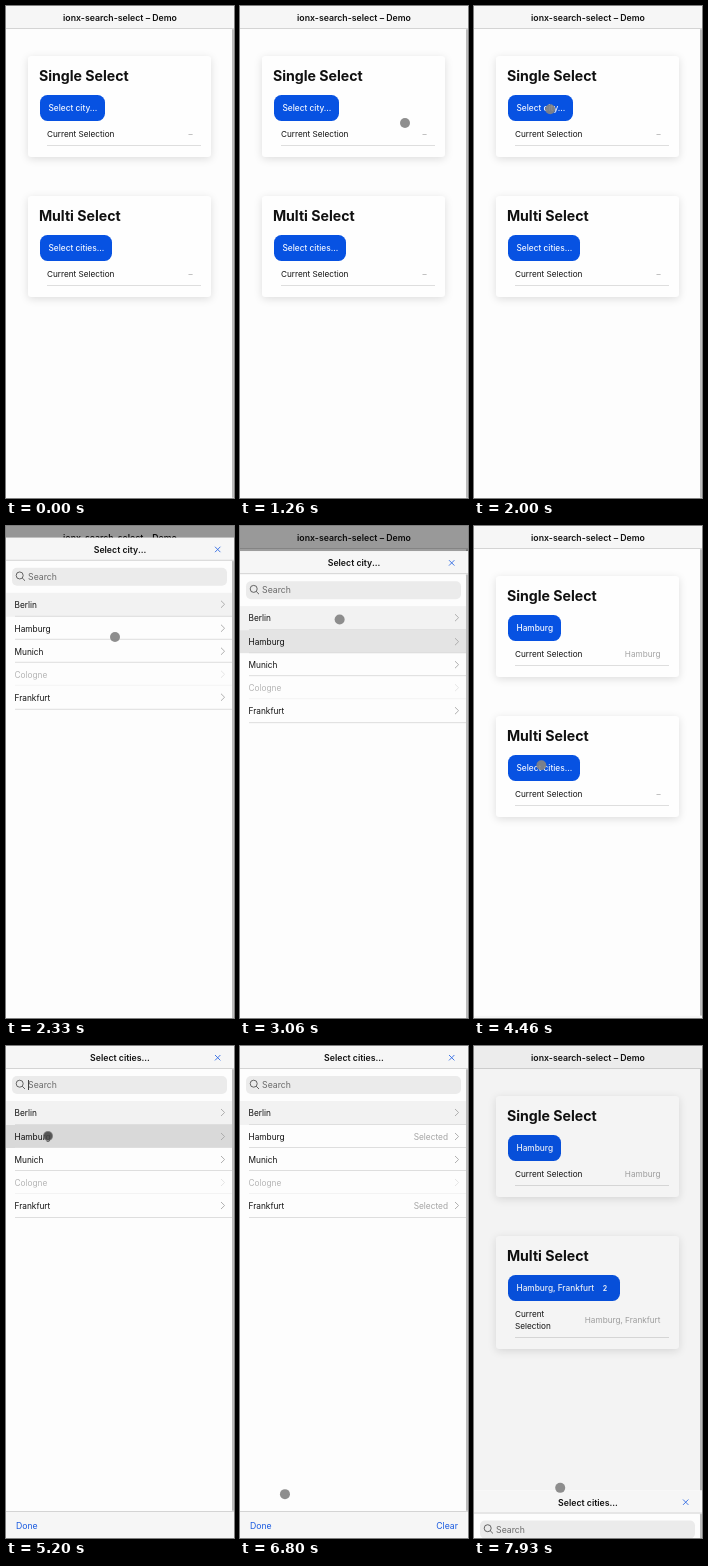
Write an HTML page that moves like this. It is 228 by 492 pixels and loops after 8 s.

```html
<!DOCTYPE html>
<html lang="en">
<meta charset="utf-8">
<title>ionx-search-select – Demo</title>
<style>
  * { box-sizing: border-box; }
  html, body { margin: 0; width: 100%; height: 100%; overflow: hidden; }
  body { position: relative; background: #fdfdfd; color: #111; font: 8.3px/12px Inter, sans-serif; }
  body > *, .page > *, .modal > *, .card > *, .bar > * { position: absolute; }
  .page, .modal, .shade { left: 0; top: 0; width: 228px; height: 492px; }
  .modal { background: #fdfdfd; }
  .shade { background: #000; }
  .bar { left: 0; width: 228px; height: 23.4px; background: #f6f6f6; border-bottom: 1px solid #d4d4d4;
    font-size: 8.75px; font-weight: 600; line-height: 24px; text-align: center; }
  .bar span { left: 0; width: 100%; }
  .scroll { right: 0; top: 23px; bottom: 0; width: 2.5px; background: #bcbcbc; border-radius: 1px; }
  .card { left: 22.3px; width: 183.2px; padding: 66.5px 10.5px 11px 18.7px; background: #fefefe;
    border-radius: 3px; box-shadow: 0 2px 8px rgba(0, 0, 0, .13); }
  h1 { margin: 0; left: 10.6px; top: 10.5px; font-size: 14.15px; line-height: 18px; font-weight: 700; white-space: nowrap; }
  .button { left: 11.7px; top: 39px; height: 26px; padding: 0 7.5px 0 8.5px; border-radius: 7.5px; background: #0752e2;
    color: #f4f7ff; font-size: 8.3px; font-weight: 500; line-height: 26px; white-space: nowrap; }
  .button.on { background: #0549ca; }
  .badge { display: inline-block; width: 15.5px; margin-left: 3px; font-size: 7px; font-weight: 700; text-align: center; }
  .card .current { position: static; display: flex; gap: 8.5px; align-items: center; padding: 5.5px 8.5px 4.5px 0;
    border-bottom: 1px solid #dedede; font-size: 8.2px; }
  .current span { flex: 1; }
  .current b, .state { font-weight: 400; color: #a3a3a3; white-space: nowrap; }
  .search { left: 6.2px; top: 29.7px; width: 215px; height: 18.6px; padding-left: 15.9px; border-radius: 5px;
    background: #ebebeb; color: #6a6a6a; font-size: 8.7px; line-height: 19px; }
  .caret { position: absolute; left: 15.8px; top: 4.3px; width: 1px; height: 10.5px; background: #444; }
  svg { position: absolute; fill: none; overflow: visible; }
  .list { top: 55.3px; width: 228px; }
  .item { position: relative; height: 23.25px; padding-left: 8.5px; line-height: 24px; }
  .item::after { content: ""; position: absolute; left: 8.5px; right: 0; bottom: 0; height: 1px; background: #dedede; }
  .item.first { background: #f2f2f2; }
  .item.off { opacity: .3; }
  .press { position: absolute; inset: 0; background: #000; }
  .state { position: absolute; right: 20px; }
  .foot { top: 465px; height: 27px; padding: 0 10px; background: #f6f6f6; border-top: 1px solid #d4d4d4; width: 228px;
    display: flex; justify-content: space-between; color: #1a5be0; font-size: 8.7px; line-height: 29px; }
  .cursor { left: -5.2px; top: -5.2px; width: 10.4px; height: 10.4px; border-radius: 50%; background: rgba(132, 132, 132, .92); }
  .cursor.on { background: rgba(70, 70, 70, .9); border: 1.6px solid rgba(130, 130, 130, .9); }
</style>
<body>
<script>
const LOOP = 8000, HEIGHT = 492;
const SLIDE = 500, FADE = 200;
const cities = ["Berlin", "Hamburg", "Munich", "Cologne", "Frankfurt"];

const icon = (x, y, color, d, width = 1) =>
  `<svg style="left:${x}px;top:${y}px" width="1" height="1" stroke="${color}" stroke-width="${width}"><path d="${d}"/></svg>`;

const card = (id, title, top) => `<div class="card" id="${id}" style="top:${top}px"><h1>${title}</h1>
  <div class="button"></div><div class="current"><span>Current Selection</span><b></b></div></div>`;

const item = (city, i) => `<div class="item ${i === 0 ? "first" : i === 3 ? "off" : ""}">${city}
  <i class="press"></i><span class="state"></span>${icon(215.3, 8.2, "#a8a8a8", "M0 0 3.6 3.5 0 7", .9)}</div>`;

document.body.innerHTML = `
  <div class="page"><div class="bar"><span>ionx-search-select – Demo</span></div>
    ${card("single", "Single Select", 50)}${card("multi", "Multi Select", 190)}<div class="scroll"></div></div>
  <div class="shade"></div>
  <div class="modal">
    <div class="bar"><span id="heading"></span>${icon(208.8, 9.2, "#2f6ae4", "M0 0 5.4 5.4M5.4 0 0 5.4", .9)}</div>
    <div class="search">Search<i class="caret"></i>
      ${icon(4, 4.7, "#555", "M7.2 3.7A3.5 3.5 0 1 1 .2 3.7A3.5 3.5 0 1 1 7.2 3.7M6.2 6.2 9 9", .9)}</div>
    <div class="list">${cities.map(item).join("")}</div>
    <div class="scroll"></div>
    <div class="foot"><span>Done</span><span id="clear">Clear</span></div>
  </div>
  <div class="cursor"></div>`;

const $ = selector => document.querySelector(selector);
const shade = $(".shade"), modal = $(".modal"), cursor = $(".cursor"), caret = $(".caret"), foot = $(".foot");
const rows = [...document.querySelectorAll(".item")];

// [time, x, y] stops of the pointer
const path = [
  [1260, 165, 117], [1760, 75, 103], [1960, 75, 103], [2330, 109, 111], [2650, 100, 93], [3030, 100, 93],
  [3530, 67, 169], [4000, 68, 243], [4400, 68, 243], [5060, 42, 90], [5330, 42, 90], [5660, 60, 164],
  [6440, 60, 164], [6800, 45, 448], [7300, 20, 484], [7690, 20, 484], [7930, 86, 442], [8000, 98, 434]
];
// Pointer down, pointer up, and what it hits: a button or a row index
const presses = [
  [1830, 1960, "single"], [2860, 3000, 1], [4260, 4400, "multi"],
  [5200, 5330, 1], [5800, 5930, 4], [7530, 7680, "done"]
];
const modals = [
  { open: 2030, close: 3050, title: "Select city..." },
  { open: 4460, close: 7745, title: "Select cities...", multi: true }
];

const clamp = v => Math.min(1, Math.max(0, v));

// cubic-bezier(.32, .72, 0, 1)
function ease(x) {
  let lo = 0, hi = 1;
  for (let i = 0; i < 24; i++) {
    const s = (lo + hi) / 2;
    if (.96 * (1 - s) ** 2 * s + s ** 3 < x) lo = s; else hi = s;
  }
  const s = lo;
  return 2.16 * (1 - s) ** 2 * s + 3 * (1 - s) * s * s + s ** 3;
}

// Monotone cubic through the stops: smooth in passing, at rest on holds and turns
function slope(i, axis) {
  const step = j => path[j] && path[j + 1] ? (path[j + 1][axis] - path[j][axis]) / (path[j + 1][0] - path[j][0]) : 0;
  const before = step(i - 1), after = step(i);
  return before * after > 0 ? 2 * before * after / (before + after) : 0;
}

function pointerAt(t, axis) {
  let i = 0;
  while (i < path.length - 2 && t >= path[i + 1][0]) i++;
  const a = path[i], b = path[i + 1], span = b[0] - a[0];
  const u = clamp((t - a[0]) / span), v = 1 - u;
  return a[axis] * v * v * (1 + 2 * u) + b[axis] * u * u * (1 + 2 * v)
    + span * u * v * (v * slope(i, axis) - u * slope(i + 1, axis));
}

function setHTML(el, html) {
  if (el.shown !== html) el.innerHTML = el.shown = html;
}

function showCard(id, label, value, pressed) {
  const button = $(`#${id} .button`);
  setHTML(button, label);
  button.classList.toggle("on", pressed === id);
  setHTML($(`#${id} b`), value);
}

function render(t) {
  const press = presses.find(p => t >= p[0] && t < p[1]);
  const lastPress = presses.filter(p => t >= p[0]).pop() || [];
  const target = press && press[2];
  const { open, close, title, multi } = modals[t < 4000 ? 0 : 1];
  const shown = ease(clamp((t - open) / SLIDE)) * (1 - ease(clamp((t - close) / SLIDE)));

  const both = "Hamburg, Frankfurt";
  const chosen = t >= modals[0].close, done = t >= modals[1].close;
  showCard("single", chosen ? "Hamburg" : "Select city...", chosen ? "Hamburg" : "–", target);
  showCard("multi", done ? both + '<span class="badge">2</span>' : "Select cities...", done ? both : "–", target);

  shade.style.opacity = .4 * shown;
  modal.style.transform = `translateY(${HEIGHT * (1 - shown)}px)`;
  modal.style.visibility = shown > 0 ? "visible" : "hidden";
  setHTML($("#heading"), title);
  foot.style.display = multi ? "" : "none";
  $(".modal .scroll").style.bottom = multi ? "27px" : 0;
  $("#clear").style.opacity = t >= 5330 ? 1 : 0;
  caret.style.opacity = t >= 5000 && t < 5330 ? 1 : 0;
  rows.forEach((row, i) => {
    const selected = multi && (i === 1 && t >= 5330 || i === 4 && t >= 5930);
    setHTML(row.querySelector(".state"), selected ? "Selected" : "");
    const glow = lastPress[2] === i ? clamp(1 - (t - lastPress[1]) / FADE) : 0;
    row.querySelector(".press").style.opacity = .14 * glow;
  });

  cursor.style.transform = `translate(${pointerAt(t, 1)}px, ${pointerAt(t, 2)}px)`;
  cursor.style.opacity = t >= path[0][0] ? 1 : 0;
  cursor.classList.toggle("on", !!press);
}

function tick() {
  render(performance.now() % LOOP);
  requestAnimationFrame(tick);
}
tick();
</script>
</body>
</html>
```
